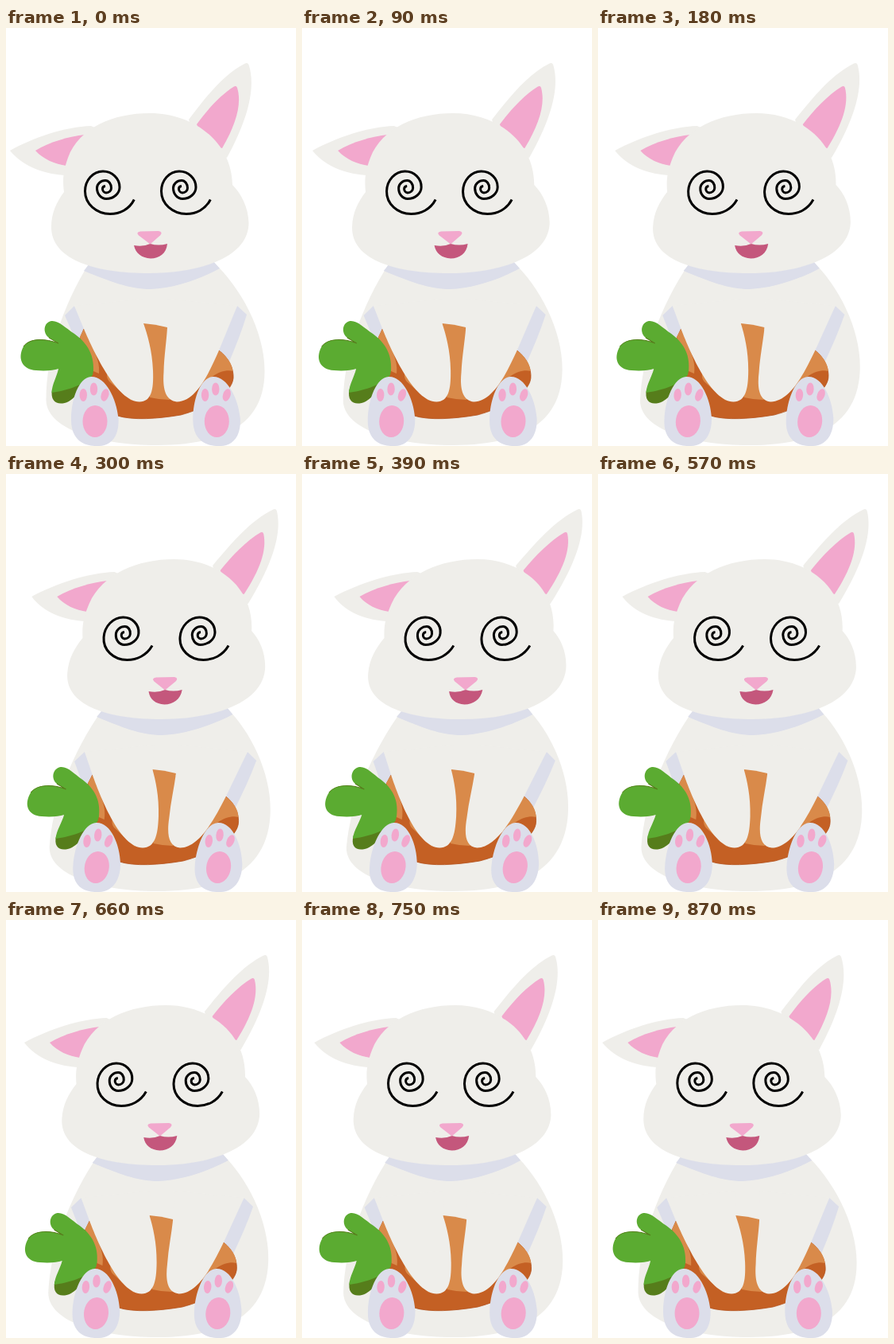
Write an HTML page that moves like this. It is 365 px wide and 525 px high and loops after 0.9 s.

```html
<!DOCTYPE html>
<html lang="en">
<head>
<meta charset="utf-8">
<title>Dizzy rabbit</title>
<style>
  html, body { margin: 0; width: 100%; height: 100%; overflow: hidden; background: #fff; }
  svg { display: block; width: 365px; height: 525px; }
  .fur { fill: #efeeea; }
  .shade { fill: #dcdeea; }
  .pink { fill: #f2a8cd; }
  .light { fill: #d98a4a; }
  .dark { fill: #c46024; }
</style>
</head>
<body>
<svg viewBox="0 0 365 525">
  <defs>
    <path id="eye" fill="none" stroke="#000" stroke-width="3" d="M161.3 215.5C155 228 143 233.5 131 233.5A31.5 28.5 0 0 1 99.5 205A22.5 25 0 0 1 122 180A21 20 0 0 1 143 200A17 14.5 0 0 1 126 214.5A11.5 13.5 0 0 1 114.5 201A10.5 9.5 0 0 1 125 191.5A7.5 9.5 0 0 1 132.5 201A6.5 6 0 0 1 126 207A5 5 0 0 1 121.5 202Q121.5 199 125 198.5"/>
    <g id="foot">
      <path class="shade" d="M107 438C125 437 139 465 141.500 490C143 515 130 525 117 525C95 526 82 515 82 492C82 465 92 439 107 438Z"/>
      <g class="pink">
        <ellipse cx="112" cy="494" rx="15.500" ry="20"/>
        <ellipse cx="97.300" cy="461" rx="4.700" ry="8"/>
        <ellipse cx="110.500" cy="453.500" rx="4.700" ry="8"/>
        <ellipse cx="124.500" cy="461" rx="4.700" ry="8" transform="rotate(18 124.500 461)"/>
      </g>
    </g>
  </defs>
  <g id="rabbit">
    <path class="fur" d="M105 295C70 350 50 415 50.500 468C52 505 120 524 190 524C270 524 326 500 325.500 430C325 380 295 325 260 293Z"/>
    <path class="shade" d="M105 296L98 305C130 318 155 328 182 328C212 327 245 315 269 302L260 292Z"/>
    <path class="shade" d="M74 361L86 349L106 388L92 402Z"/>
    <path class="shade" d="M291 349L303 360C297 380 289 400 281 419L262 408Z"/>

    <!-- carrot -->
    <path class="dark" stroke="#b4521d" stroke-width=".8" d="M98 378L173 380L203 380L268 405C280 414 287 428 286 440C284 460 250 478 220 486C190 491 160 493 140 487C112 475 100 440 92 392Z"/>
    <path class="light" d="M98 378L93 388C98 408 104 422 110 431L117 434C118 424 115 414 111 406L128 430C126 436 127 440 130 444L158 468L160 440Z"/>
    <path class="light" d="M268 405C278 412 285 422 285.500 431C278 429 268 432 261 437C254 442 248 448 236 457L250 415Z"/>
    <path class="light" d="M173 371Q188 372 203 376L206 467Q194 467 181 464Z"/>

    <!-- arms -->
    <path class="fur" d="M86 349L98 378C112 410 140 469 168 469.500C183 469 186 455 185 430C184 405 178 385 173 371L173 340Z"/>
    <path class="fur" d="M291 349L268 405C256 432 240 469 215 469.500C200 468 197 452 198.500 432C199 412 202 394 203 376L203 340Z"/>

    <!-- leaves -->
    <path fill="#567d1b" d="M58 454C55 471 67 475 79 469C90 462 98 450 108 438Z"/>
    <path fill="#5bab31" d="M110 430C111 408 100 394 86 384C74 376 66 367 57 368C47 370 46 383 54 389L66 396C50 390 30 388 22 400C14 415 20 429 38 430C50 431 60 430 66 428C64 438 58 447 57.500 458C72 456 98 450 109 436Z"/>
    <path fill="none" stroke="#567d1b" stroke-width="1" d="M22 400C30 389 50 390 66 396L54 389"/>

    <use href="#foot"/>
    <use href="#foot" x="153.300"/>

    <!-- head -->
    <path class="fur" d="M5 154C35 137 75 124 107 123L114 126L130 160L76 185C50 184 22 175 5 154Z"/>
    <path class="pink" d="M37 154C55 143 80 136 99 134L110 160L76 173C62 171 47 165 37 154Z"/>
    <path class="fur" d="M230 115C252 86 274 58 301 44.500Q304 43 305.500 46C314 72 307 110 278 163L240 150Z"/>
    <path class="pink" d="M240 121C253 103 270 84 287 73.500Q290 72 291 75C297 95 290 120 272 151L250 145Z"/>
    <path class="fur" d="M73 206C71 190 72 180 78 163C92 125 135 107 181 107C235 107 284 142 285 197C296 208 305 225 305.500 245C305 290 240 308 180 308C110 308 57 290 57 250C57 232 64 218 73 206Z"/>
    <use href="#eye"/>
    <use href="#eye" x="96"/>
    <path fill="#c4577c" d="M161 273Q173 275 181.500 271Q192 274 203 271C202 283 193 289.500 182 289.500C171 289 163 283 161 273Z"/>
    <path class="pink" d="M169 255.500L192 255Q198 256 194 260.500L181.500 271.500L167 260.500Q163 256.500 169 255.500Z"/>
  </g>
</svg>
<script>
  const LOOP = 900, STEP = 30, PEAK = 420, LAST = 870;
  const LEAN = 0.103, REST = 0.001, FLOOR = 525;
  const rabbit = document.getElementById('rabbit');

  // Steady lean to the right, then steadily back, pivoting on the floor.
  function lean(t) {
    if (t <= PEAK) return LEAN * t / PEAK;
    return LEAN + (REST - LEAN) * (t - PEAK) / (LAST - PEAK);
  }

  function draw(now) {
    const t = Math.floor((now % LOOP) / STEP) * STEP;
    const k = lean(t);
    rabbit.setAttribute('transform', `matrix(1 0 ${-k} 1 ${k * FLOOR} 0)`);
  }

  let start = null;
  function tick(now) {
    if (start === null) start = now;
    draw(now - start);
    requestAnimationFrame(tick);
  }
  draw(0);
  requestAnimationFrame(tick);
</script>
</body>
</html>
```
